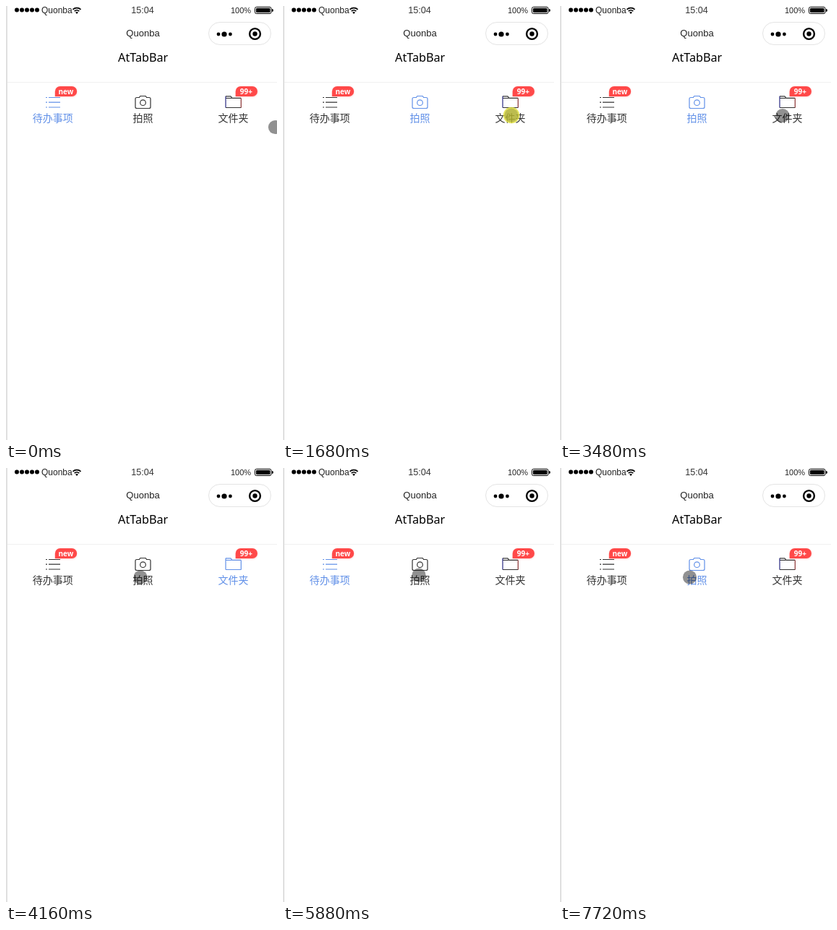
Recreate the animation shown at these times as an HTML page. Size 375 by 600 pixels, loop 7.76 s.

```html
<!DOCTYPE html>
<html lang="zh">
<head>
<meta charset="utf-8">
<title>AtTabBar</title>
<style>
  html, body { margin: 0; width: 100%; height: 100%; overflow: hidden; background: #fff; }
  svg { display: block; width: 375px; height: 600px; }
  text { text-anchor: middle; }
  .ui { font-family: "Liberation Sans", Arial, sans-serif; }
  .latin { font-family: "Noto Sans", "Open Sans", sans-serif; }
  .label { font: 300 14px "Noto Sans CJK SC", "Noto Sans CJK", sans-serif; }
  .badge { font-size: 10px; font-weight: 600; fill: #fff; }
  .icon { fill: none; stroke-width: 1.2; stroke-linejoin: round; }
</style>
</head>
<body>
<svg viewBox="0 0 375 600">
  <rect width="375" height="600" fill="#fff"/>
  <rect width="2" height="600" fill="#e0e0e0"/>

  <!-- Status bar -->
  <path d="M15 5.6h28.1" stroke="#000" stroke-width="6" stroke-linecap="round" stroke-dasharray="0 7"/>
  <text class="ui" x="49" y="10" font-size="12" fill="#222" style="text-anchor:start">Quonba</text>
  <g fill="none" stroke="#000" stroke-width="1.7">
    <path d="M92.5 4.8a8 8 0 0 1 11 0M94.7 7.2a4.8 4.8 0 0 1 6.6 0"/>
    <path d="M98 11l-2-2.2a3 3 0 0 1 4 0z" fill="#000" stroke="none"/>
  </g>
  <text class="ui" x="189" y="10" font-size="12.6" fill="#333">15:04</text>
  <text class="ui" x="325" y="10" font-size="11" fill="#222">100%</text>
  <rect x="344.5" y="1.5" width="22.5" height="9" rx="2" fill="none" stroke="#000"/>
  <rect x="346" y="3" width="19.5" height="6" rx="1"/>
  <path d="M368 4a2 2 0 0 1 0 4z"/>

  <!-- Navigation bar -->
  <text class="ui" x="189.5" y="42" font-size="13" fill="#222">Quonba</text>
  <rect x="280.5" y="22.5" width="86" height="31" rx="15.5" fill="#fff" stroke="#e4e4e4"/>
  <circle cx="294" cy="39" r="2.4"/>
  <circle cx="302" cy="39" r="3.6"/>
  <circle cx="310.4" cy="39" r="2.4"/>
  <circle cx="344.5" cy="38.5" r="7.4" fill="none" stroke="#000" stroke-width="2.4"/>
  <circle cx="344.5" cy="38.5" r="3.2"/>
  <text class="latin" x="189.7" y="77" font-size="16.2">AtTabBar</text>
  <path d="M2 105.5h373" stroke="#f0f0f0"/>

  <!-- Tabs -->
  <g class="icon">
    <path data-tab="0" d="M59 126.5h16M59 133.2h16M59 140h16M55 126.5h2M55 133.2h2M55 140h2"/>
    <path data-tab="1" d="M181 126.5h3.5l1.2-2h7.6l1.2 2h3.5a2 2 0 0 1 2 2v11a2 2 0 0 1-2 2h-17a2 2 0 0 1-2-2v-11a2 2 0 0 1 2-2z"/>
    <circle data-tab="1" cx="189.5" cy="133.7" r="3.8"/>
    <path data-tab="2" d="M304 124.8h7l1.8 2.6h12.4M304 127.5h8M304 140.5h21.4"/>
    <path data-tab="2" data-idle="40,40,130" d="M304 124.8v15.7"/>
    <path data-tab="2" data-idle="140,50,50" d="M325.3 127.4v13.1"/>
  </g>
  <text class="label" data-tab="0" x="64.7" y="160.2">待办事项</text>
  <text class="label" data-tab="1" x="189.5" y="160.2">拍照</text>
  <text class="label" data-tab="2" x="314.5" y="160.2">文件夹</text>

  <defs>
    <path id="badge" d="M0 14V7a7 7 0 0 1 7-7h16.3a7 7 0 0 1 0 14z"/>
  </defs>
  <g fill="#ff4949" style="filter:drop-shadow(0 1px 1px rgba(255,73,73,.25))">
    <use href="#badge" x="67.9" y="111"/>
    <use href="#badge" x="317.7" y="111"/>
  </g>
  <text class="latin badge" x="82.8" y="121.7">new</text>
  <text class="latin badge" x="332.4" y="121.7">99+</text>

  <g id="pointer">
    <circle id="halo" r="11.3" fill="#e0e03a" fill-opacity=".8"/>
    <circle id="dot" r="9.6"/>
  </g>
</svg>
<script>
const LOOP = 7760, STEP = 80, PRESS = 120, TRAVEL = 640, DIP = 8;
const FADE_DELAY = 100, FADE = 200, TAB_WIDTH = 125;
const IDLE = [51, 51, 51], ACTIVE = [97, 144, 232];

const entry = { time: 0, x: 372.5, y: 167.5 };
const tap = (time, x, y = 151) => ({ time, x, y, tab: Math.floor(x / TAB_WIDTH) });
const taps = [
  tap(920, 205, 144.5), tap(1680, 316), tap(2480, 77), tap(2960, 190), tap(3720, 310),
  tap(4240, 186), tap(5000, 61.5), tap(6200, 188, 148), tap(6720, 66), tap(7280, 179.5)
];
const stops = [entry, ...taps];

const $ = id => document.getElementById(id);
const tabParts = [...document.querySelectorAll("[data-tab]")];
const lerp = (a, b, k) => a + (b - a) * k;
const clamp01 = v => Math.min(1, Math.max(0, v));
const smooth = k => k * k * (3 - 2 * k);

// After each press the pointer glides in a shallow arc to the next stop.
function pointerAt(t) {
  const i = stops.findLastIndex(stop => stop.time <= t);
  const from = stops[i], to = stops[i + 1] ?? from;
  const depart = from.time + PRESS;
  const duration = Math.min(TRAVEL, to.time - PRESS - depart);
  if (to === from || t < depart) return [from.x, from.y];
  const elapsed = Math.ceil((t - depart) / STEP) * STEP;
  const k = smooth(clamp01(elapsed / duration));
  return [lerp(from.x, to.x, k), lerp(from.y, to.y, k) + DIP * 4 * k * (1 - k)];
}

function tabLevels(t) {
  let levels = [1, 0, 0];
  for (const { time, tab } of taps) {
    const k = clamp01((t - time - FADE_DELAY) / FADE);
    levels = levels.map((v, i) => lerp(v, i === tab ? 1 : 0, k));
  }
  return levels;
}

function render(t) {
  const levels = tabLevels(t);
  for (const el of tabParts) {
    const idle = el.dataset.idle ? el.dataset.idle.split(",").map(Number) : IDLE;
    const level = levels[el.dataset.tab];
    const color = `rgb(${idle.map((c, i) => Math.round(lerp(c, ACTIVE[i], level)))})`;
    el.setAttribute(el.tagName === "text" ? "fill" : "stroke", color);
  }
  const pressed = taps.some(({ time }) => t >= time && t < time + PRESS);
  $("pointer").setAttribute("transform", `translate(${pointerAt(t)})`);
  $("halo").setAttribute("visibility", pressed ? "visible" : "hidden");
  $("dot").setAttribute("fill-opacity", pressed ? 0.18 : 0.43);
}

const began = performance.now();
function tick() {
  render((performance.now() - began) % LOOP);
  requestAnimationFrame(tick);
}
tick();
</script>
</body>
</html>
```
